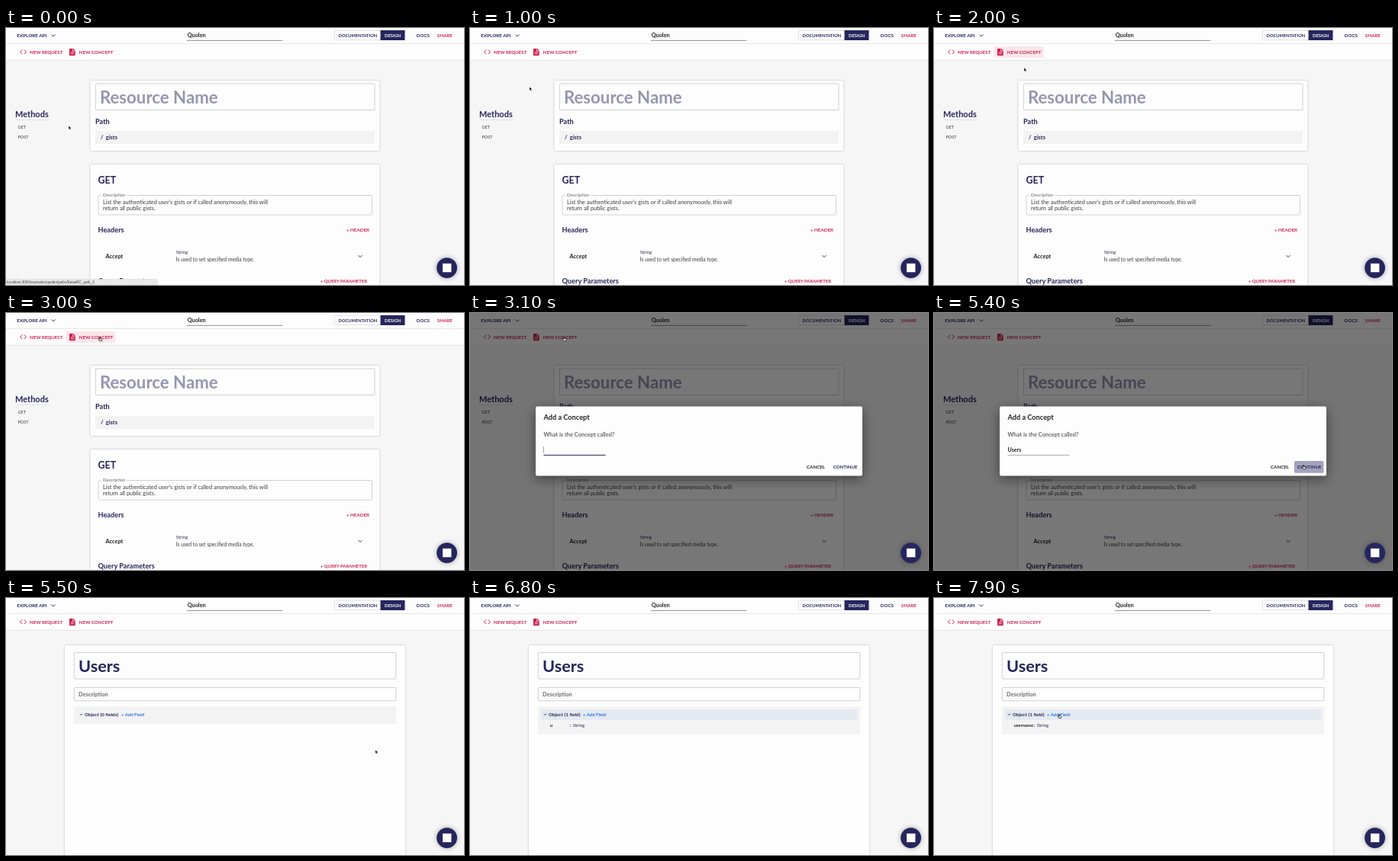
An HTML page that plays this animation: 600 by 337 pixels, repeating every 8 s.

```html
<!DOCTYPE html>
<html lang="en">
<head>
<meta charset="utf-8">
<title>API designer</title>
<style>
  html, body { margin: 0; width: 100%; height: 100%; overflow: hidden; background: #f6f6f6; }
  svg { display: block; width: 100vw; height: 100vh; }
  text { font-family: Lato, "Open Sans", sans-serif; font-weight: 700; fill: #25265e; white-space: pre; }
  .reg { font-weight: 400; }
  .ink { fill: #222; }
  .soft { fill: #3a3a3a; }
  .pink { fill: #d01f4c; }
  .blue { fill: #2f76e0; }
  .card { fill: #fdfdfd; filter: drop-shadow(0 .6px 1px #0004); }
  .box { fill: none; stroke: #c6c6c6; stroke-width: .8; }
  .line { fill: none; stroke: #25265e; stroke-width: .9; }
  .panel { fill: #f3f3f3; }

  .timed { animation: 8s step-end infinite backwards; }
  .status { animation: status 8s linear infinite; }
  .request { animation-name: request; }
  .concept { animation-name: concept; }
  .tool-hover { animation-name: tool-hover; }
  .dialog { animation-name: dialog; }
  .focus { animation-name: focus; }
  .caret { animation-name: caret; }
  .go { animation-name: go; }
  .empty { animation-name: empty; }
  .filled { animation-name: filled; }
  .row-hover { animation-name: row-hover; }
  .name tspan { animation: type-name 8s step-end calc(var(--i) * 150ms) infinite backwards; }
  .field tspan { animation: type-field 8s step-end calc(var(--i) * 90ms) infinite backwards; }
  .cursor { animation: move 8s linear infinite; }
  .cursor-look { animation-name: cursor-look; }
  .arrow { animation-name: arrow; }
  .hand { animation-name: hand; }

  @keyframes status { 0%, 1.25% { opacity: 1 } 5%, 100% { opacity: 0 } }
  @keyframes request { 0% { opacity: 1 } 68.75% { opacity: 0 } }
  @keyframes concept { 0% { opacity: 0 } 68.75% { opacity: 1 } }
  @keyframes tool-hover {
    0% { opacity: 0 } 23.75% { opacity: 1 } 26.25% { opacity: 0 }
    32.5% { opacity: 1 } 38.75% { opacity: 0 }
  }
  @keyframes dialog { 0% { opacity: 0 } 38.75% { opacity: 1 } 68.75% { opacity: 0 } }
  @keyframes focus { 0% { opacity: 1 } 67.5% { opacity: 0 } }
  @keyframes caret {
    0% { opacity: 1; transform: none }
    46.25% { transform: translateX(5.4px) }
    48.125% { transform: translateX(8.5px) }
    50% { transform: translateX(12.2px) }
    51.875% { transform: translateX(15px) }
    53.75% { opacity: 1; transform: translateX(18.2px) }
    60% { opacity: 0; transform: translateX(18.2px) }
  }
  @keyframes go { 0% { opacity: 0 } 61.25% { opacity: .3 } 66.25% { opacity: 1 } }
  @keyframes type-name { 0% { font-size: 0 } 46.25% { font-size: 7.1px } }
  @keyframes empty { 0% { opacity: 1 } 82.5% { opacity: 0 } }
  @keyframes filled { 0% { opacity: 0 } 82.5% { opacity: 1 } }
  @keyframes row-hover { 0% { opacity: 0 } 78.75% { opacity: 1 } }
  @keyframes type-field { 0% { font-size: 0 } 85% { font-size: 5.8px } }
  @keyframes move {
    0%, 1.25% { transform: translate(82px, 128px) }
    6.25% { transform: translate(92px, 70px) }
    11.25% { transform: translate(98px, 30px) }
    12.5%, 20% { transform: translate(78px, 77px) }
    23.75% { transform: translate(122px, 32px) }
    27.5%, 28.75% { transform: translate(110px, 91px) }
    30% { transform: translate(62px, 58px) }
    32.5%, 56.25% { transform: translate(123px, 31px) }
    61.25%, 68.75% { transform: translate(484px, 199px) }
    70% { transform: translate(470px, 196px) }
    78.75%, 93.75% { transform: translate(164px, 151px) }
    96.25% { transform: translate(167px, 154px) }
    98.75%, 100% { transform: translate(164px, 152px) }
  }
  @keyframes cursor-look {
    0% { opacity: 1 } 46.25% { opacity: 0 } 56.25% { opacity: 1 }
    85% { opacity: 0 } 95% { opacity: 1 }
  }
  @keyframes arrow {
    0% { opacity: 1 } 32.5% { opacity: 0 } 40% { opacity: 1 }
    61.25% { opacity: 0 } 68.75% { opacity: 1 } 78.75% { opacity: 0 }
  }
  @keyframes hand {
    0% { opacity: 0 } 32.5% { opacity: 1 } 40% { opacity: 0 }
    61.25% { opacity: 1 } 68.75% { opacity: 0 } 78.75% { opacity: 1 }
  }
</style>
</head>
<body>
<svg viewBox="0 0 600 337" preserveAspectRatio="none">
  <rect width="600" height="337" fill="#f6f6f6"/>

  <!-- request page -->
  <g class="timed request">
    <text x="12" y="117" font-size="11">Methods</text>
    <path d="M12 120.5h45" stroke="#dcdce2" stroke-width=".7"/>
    <text class="reg soft" x="15.5" y="131.8" font-size="5.6">GET</text>
    <text class="reg soft" x="15.5" y="145.3" font-size="5.6">POST</text>

    <rect class="card" x="110.5" y="69" width="379" height="92" rx="1.5"/>
    <rect class="box" x="117.5" y="73" width="365.5" height="34.5" rx="1"/>
    <text x="123" y="98.7" font-size="22.2" style="fill:#9696b1">Resource Name</text>
    <text x="117" y="125.5" font-size="9.2">Path</text>
    <rect class="panel" x="117" y="135" width="366" height="17"/>
    <text x="124" y="145.8" font-size="7.6">/</text>
    <text x="130.7" y="145.8" font-size="7.5">gists</text>

    <rect class="card" x="110.5" y="179" width="379" height="165" rx="1.5"/>
    <text x="120.5" y="203.5" font-size="12.5">GET</text>
    <rect class="box" x="121" y="219.5" width="358.5" height="25.5" rx="1.5"/>
    <rect x="125" y="218" width="33" height="3" fill="#fdfdfd"/>
    <text class="reg" x="127" y="221.3" font-size="5.75" style="fill:#666">Description</text>
    <text class="reg soft" x="127" y="230.6" font-size="7.4">List the authenticated user's gists or if called anonymously, this will</text>
    <text class="reg soft" x="127" y="238.8" font-size="7.4">return all public gists.</text>
    <text x="120.5" y="267.8" font-size="9.2">Headers</text>
    <text class="pink" x="446" y="267.2" font-size="6.2">+ HEADER</text>
    <text class="ink" x="130.5" y="301.5" font-size="7.4">Accept</text>
    <text class="reg" x="222.8" y="295.6" font-size="6">String</text>
    <text class="reg soft" x="222.8" y="305.6" font-size="6.7">Is used to set specified media type.</text>
    <path class="line" d="M461.5 298l2.5 2.5 2.5-2.5"/>
    <text x="120.5" y="334.6" font-size="9.2">Query Parameters</text>
    <text class="pink" x="412" y="334.1" font-size="5.9">+ QUERY PARAMETER</text>
  </g>

  <!-- concept page -->
  <g class="timed concept">
    <rect class="card" x="77" y="62" width="446" height="285" rx="1.5"/>
    <rect class="box" x="89.3" y="71.5" width="421.5" height="34.5" rx="1"/>
    <text x="95" y="97.3" font-size="21.7">Users</text>
    <rect class="box" x="89.3" y="117.5" width="421.5" height="17.3" rx="1"/>
    <text x="95" y="129" font-size="7.5" style="fill:#6c6c6c">Description</text>
    <rect class="panel" x="89" y="142" width="422" height="23"/>
    <rect class="panel timed filled" x="89" y="142" width="422" height="36.5"/>
    <rect class="timed row-hover" x="93" y="146" width="414" height="13.8" fill="#e3e9f0"/>
    <path class="line" d="M96.7 151.8l1.7 1.7 1.7-1.7"/>
    <g class="timed empty" font-size="6.3">
      <text x="103" y="155">Object (0 fields)</text>
      <text class="blue" x="151" y="155" font-size="6">+ Add Field</text>
    </g>
    <g class="timed filled" font-size="6.3">
      <text x="103" y="155">Object (1 field)</text>
      <text class="blue" x="148" y="155" font-size="6">+ Add Field</text>
      <text class="ink field" x="104.7" y="168.7" font-size="5.8"><tspan style="--i:0">u</tspan><tspan style="--i:1">s</tspan><tspan style="--i:2">e</tspan><tspan style="--i:3">r</tspan><tspan style="--i:4">n</tspan><tspan style="--i:5">a</tspan><tspan style="--i:6">m</tspan><tspan style="--i:7">e</tspan></text>
      <text class="ink" x="131" y="168.7" font-size="6.1">:</text>
      <text class="reg" x="134.8" y="168.7" font-size="6">String</text>
    </g>
  </g>

  <!-- top bars -->
  <rect width="600" height="42" fill="#fdfdfd"/>
  <path d="M0 20.5h600M0 42.3h600" stroke="#e2e2e2" stroke-width=".8"/>
  <text x="14.3" y="11.9" font-size="6.3">EXPLORE API</text>
  <path class="line" d="M59.5 8.5l2.6 2.6 2.6-2.6"/>
  <text class="ink" x="237.7" y="12.2" font-size="7.3">Quolen</text>
  <path d="M237 16.4h125.5" stroke="#777" stroke-width=".8"/>
  <rect x="430.3" y="3.3" width="92" height="12.4" rx="1" fill="#fdfdfd" stroke="#d8d8de" stroke-width=".7"/>
  <rect x="490.5" y="3" width="32" height="13" fill="#25265e"/>
  <text x="435.6" y="11.7" font-size="5.7">DOCUMENTATION</text>
  <text x="496" y="11.7" font-size="5.8" style="fill:#fff">DESIGN</text>
  <text x="537.7" y="11.9" font-size="6.2">DOCS</text>
  <text class="pink" x="564.8" y="11.9" font-size="6.2">SHARE</text>

  <rect class="timed tool-hover" x="78.5" y="24" width="65" height="15" rx="1.5" fill="#fae6eb"/>
  <path d="M21.3 28.5l-2.7 2.8 2.7 2.8M23.8 28.5l2.7 2.8-2.7 2.8" fill="none" stroke="#d01f4c" stroke-width="1"/>
  <text class="pink" x="31" y="33.6" font-size="6.1">NEW REQUEST</text>
  <path class="pink" d="M83.9 27h4l2.8 2.8v5.5q0 .9-.9.9h-5.9q-.9 0-.9-.9v-7.4q0-.9.9-.9z"/>
  <path d="M84.8 31.9h4.1M84.8 33.8h4.1M87.5 27.7v2.5h2.5" fill="none" stroke="#fdfdfd" stroke-width=".7"/>
  <text class="pink" x="95.8" y="33.6" font-size="6.1">NEW CONCEPT</text>

  <g class="status">
    <rect x="-1" y="329.3" width="199" height="9" rx="1" fill="#e9e9e9" stroke="#cfcfcf" stroke-width=".5"/>
    <text class="reg" x="1.3" y="335" font-size="4.6" style="fill:#444;font-family:'Liberation Sans',sans-serif">localhost:3000/examples/quolen/paths/EeweRC_path_3</text>
  </g>

  <!-- dialog -->
  <g class="timed dialog">
    <rect width="600" height="337" opacity=".53"/>
    <rect x="86" y="122.5" width="428" height="91" rx="2" fill="#fdfdfd" style="filter:drop-shadow(0 4px 8px #0007)"/>
    <text x="96.5" y="140" font-size="9.2" style="fill:#222">Add a Concept</text>
    <text x="96.5" y="162.4" font-size="7.5" style="fill:#666">What is the Concept called?</text>
    <text class="ink name" x="96.5" y="182" font-size="7.1"><tspan style="--i:0">U</tspan><tspan style="--i:1">s</tspan><tspan style="--i:2">e</tspan><tspan style="--i:3">r</tspan><tspan style="--i:4">s</tspan></text>
    <path d="M96.5 186.4h81" stroke="#888" stroke-width=".7"/>
    <path class="timed focus" d="M96.5 186.4h81" stroke="#34356a" stroke-width="1"/>
    <rect class="timed caret" x="96.4" y="175" width=".6" height="8.6" fill="#666"/>
    <rect class="timed go" x="472" y="194" width="38.5" height="15.7" rx="1.5" fill="#a3a3bd"/>
    <text class="ink" x="441" y="204.2" font-size="6.2">CANCEL</text>
    <text x="475.7" y="204.2" font-size="6.1">CONTINUE</text>
  </g>

  <!-- help button -->
  <circle cx="577.6" cy="314.6" r="13.4" fill="#25265e" style="filter:drop-shadow(0 .8px 3px #0005)"/>
  <rect x="572" y="308.8" width="11.4" height="11.4" fill="#fff"/>

  <g class="cursor">
    <g class="timed cursor-look" stroke="#fff" stroke-width=".5" stroke-linejoin="round">
      <path class="timed arrow" d="M0 0v5.2l1.2-1.1.8 1.8.9-.4-.8-1.7h1.6z"/>
      <path class="timed hand" d="M-.5.6q.5-.7 1 0v1.8l1.8.4q.7.3.6.9l-.4 2h-2.7l-1.5-1.9q-.2-.7.5-.5l.7.5z" fill="#eee" stroke="#111" stroke-width=".7"/>
    </g>
  </g>
</svg>
</body>
</html>
```
